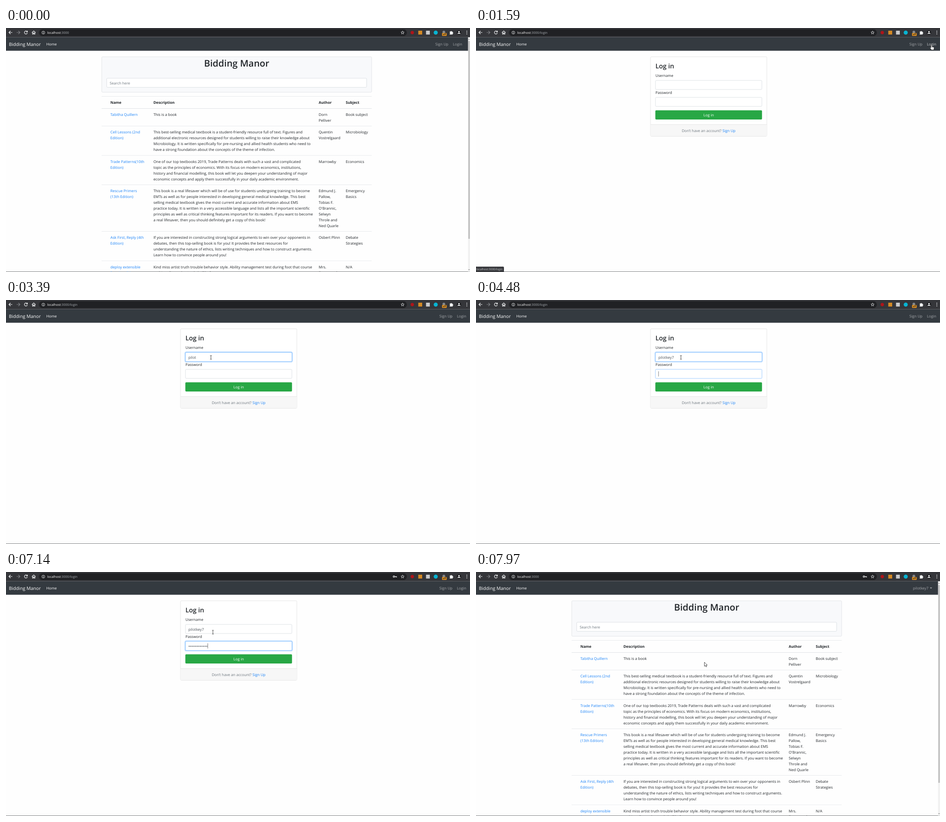
Write an HTML page that moves like this. It is 1029 px wide and 544 px high and loops after 8 s.

```html
<!DOCTYPE html>
<html lang="en">
<head>
<meta charset="utf-8">
<title>Bidding Manor</title>
<style>
html, body { margin: 0; height: 100%; overflow: hidden; background: #fff; }
svg { display: block; width: 100vw; height: 100vh; }
text { font: 8.19px "Open Sans", "Noto Sans", sans-serif; fill: #212529; text-rendering: geometricPrecision; white-space: pre; }
.link { fill: #1a82f7; }
.bold { font-weight: 700; }
.brand { font-size: 10.25px; fill: #fff; }
.white { fill: #fff; }
.nav { fill: #a3a6a9; }
.muted { fill: #6c757d; }
.h1 { font-size: 20.4px; font-weight: 600; }
.h3 { font-size: 14.4px; font-weight: 600; }
.url { font-size: 7.15px; fill: #a8adb2; }
.tip { font-size: 6.2px; fill: #c4c7ca; }
.mid { text-anchor: middle; }
.typed { fill: #495057; }
.icon { fill: none; stroke: #f1f3f4; stroke-width: 1.2; }
.ring { fill: none; stroke-width: 1.8; }
</style>
</head>
<body>
<svg id="stage" viewBox="0 0 1029 544"></svg>
<script>
const USER = "pilotkey7", LOOP = 8000;

const text = (x, y, s, cls = "", id = "") => `<text x="${x}" y="${y}" class="${cls}" id="${id}">${s}</text>`;
const rect = (x, y, w, h, fill, extra = "") => `<rect x="${x}" y="${y}" width="${w}" height="${h}" fill="${fill}" ${extra}/>`;
const circle = (x, y, r, fill) => `<circle cx="${x}" cy="${y}" r="${r}" fill="${fill}"/>`;
const path = (d, extra = 'class="icon"') => `<path d="${d}" ${extra}/>`;
const lines = (x, y, s, cls) => s.split("|").map((l, i) => text(x, y + i * 12.96, l, cls)).join("");
const box = (x, y, w, h, fill, stroke, id = "") =>
  rect(x, y, w, h, fill, `rx="2" stroke="${stroke}" stroke-width=".7" id="${id}"`);
const ring = (y, color, id) => rect(397, y - .9, 238, 22.2, "none", `class="ring" rx="3" stroke="${color}" id="${id}"`);

// name, description, author, subject, number of text lines
const books = [
  ["Tabitha Quillern", "This is a book", "Dorn|Pelliver", "Book subject", 2],
  ["Cell Lessons (2nd|Edition)", "This best-selling medical textbook is a student-friendly resource full of text. Figures and|additional electronic resources designed for students willing to raise their knowledge about|Microbiology. It is written specifically for pre-nursing and allied health students who need to|have a strong foundation about the concepts of the theme of infection.", "Quentin|Vostrelgaard", "Microbiology", 4],
  ["Trade Patterns(10th|Edition)", "One of our top textbooks 2019, Trade Patterns deals with such a vast and complicated|topic as the principles of economics. With its focus on modern economics, institutions,|history and financial modelling, this book will let you deepen your understanding of major|economic concepts and apply them successfully in your daily academic environment.", "Marrowby", "Economics", 4],
  ["Rescue Primers|(13th Edition)", "This book is a real lifesaver which will be of use for students undergoing training to become|EMTs as well as for people interested in developing general medical knowledge. This best|selling medical textbook gives the most current and accurate information about EMS|practice today. It is written in a very accessible language and lists all the important scientific|principles as well as critical thinking features important for its readers. If you want to become|a real lifesaver, then you should definitely get a copy of this book!", "Edmund J.|Pallow,|Tobias F.|O'Brannic,|Selwyn|Throle and|Ned Quarle", "Emergency|Basics", 7],
  ["Ask First, Reply (4th|Edition)", "If you are interested in constructing strong logical arguments to win over your opponents in|debates, then this top-selling book is for you! It provides the best resources for|understanding the nature of ethics, lists writing techniques and how to construct arguments.|Learn how to convince people around you!", "Osbert Plinn", "Debate|Strategies", 4],
  ["deploy extensible|functionalities", "Kind miss artist truth trouble behavior style. Ability management test during foot that course|nothing. Open plan trade half before.", "Mrs.|Rosamunde", "N/A", 2]
];

function table() {
  const columns = [231.5, 327, 693.5, 753.5];
  let top = 179.4;
  let out = rect(212, 152, 599, .7, "#dee2e6") +
    ["Name", "Description", "Author", "Subject"].map((s, i) => text(columns[i], 169.2, s, "bold")).join("");
  books.forEach((book, row) => {
    out += rect(212, top - .4, 599, row ? .7 : 1, "#dee2e6");
    columns.forEach((x, i) => out += lines(x, top + 16.6, book[i], i ? "" : "link"));
    top += 12.96 * (book[4] + 1) + .54;
  });
  return out;
}

const browser = rect(0, 0, 1029, 20.7, "#35363a") + rect(73, 2.7, 816, 15.2, "#202124", 'rx="7.6"') +
  path("M14 10H6.5M10 6.5L6.5 10l3.5 3.5") +
  path("M23.5 10H31M27.5 6.5L31 10l-3.5 3.5", 'class="icon" style="stroke:#808286"') +
  path("M46.8 7.8a3.4 3.4 0 1 0 .6 3.4M47.5 6v2.8h-2.8") +
  path("M57.5 10.3l4-3.7 4 3.7M58.8 9.5v4.2h1.8v-2.5h1.8v2.5h1.8V9.5") +
  `<circle cx="82.8" cy="10.3" r="3.3" class="icon" style="stroke-width:.8"/>` + path("M82.8 8.2v.9M82.8 9.8v2.4") +
  `<text x="91.5" y="13" class="url"><tspan fill="#fff">localhost</tspan>:3000<tspan id="urlPath"></tspan></text>` +
  `<g id="key"><circle cx="860.2" cy="10.3" r="1.7" class="icon"/>${path("M862 10.3h4.2v1.7M864.3 10.3v1.4")}</g>` +
  path("M879.5 6.6l1 2.4 2.6.2-2 1.7.6 2.5-2.2-1.4-2.2 1.4.6-2.5-2-1.7 2.6-.2z", 'class="icon" style="stroke-width:.8"') +
  circle(901, 10.3, 3.7, "#b0141a") + rect(914.3, 6, 8.6, 8.6, "#d58a24") + rect(931.5, 6, 8.4, 8.6, "#c9cacc") +
  circle(953, 10.3, 4.5, "#08b4d2") + circle(971, 9, 3, "#85888c") + rect(967, 11.2, 10.2, 6.4, "#f39a1e", 'rx="1"') +
  `<text x="972.1" y="16.2" class="mid bold" style="font-size:5.4px">off</text>` +
  path("M984 8h2a1.3 1.3 0 1 1 2.6 0h2v2a1.3 1.3 0 1 1 0 2.6v1.8H984v-2a1.3 1.3 0 0 0 0-2.4z", 'fill="#f1f3f4"') +
  circle(1004.6, 10.2, 5, "#202124") + circle(1004.6, 8.4, 1.7, "#f1f3f4") + path("M1001.3 13.1c0-3.2 6.6-3.2 6.6 0z", 'fill="#f1f3f4"') +
  [7, 10.2, 13.4].map(y => circle(1022, y, .9, "#e8eaed")).join("");

const navbar = rect(0, 20.7, 1029, 30, "#343a40") + text(6.5, 39.8, "Bidding Manor", "brand") + text(89.5, 39, "Home", "white");

const home = `<g id="home">` +
  box(212.3, 64.2, 598.6, 79, "#f8f9fb", "#d9dcdf") + text(511.5, 86, "Bidding Manor", "h1 mid") +
  box(223.3, 112, 576.5, 20.3, "#fff", "#ced4da") + text(230, 125.8, "Search here", "muted") + table() +
  rect(1024.6, 20.7, 4.4, 523, "#f1f1f1") + rect(1025.2, 29, 3.4, 441, "#c1c1c1") +
  path("M1025.3 26l1.5-2 1.5 2zM1025.3 538l1.5 2 1.5-2z", 'fill="#777"') +
  `<g id="account">${text(969, 39, USER, "nav")}${path("M1006.4 34.5h5.2l-2.6 2.7z", 'fill="#a3a6a9"')}</g></g>`;

const login = `<g id="login">` +
  box(387, 64.2, 258, 177.2, "#fff", "#dcdcdc") +
  rect(387.4, 215, 257.2, 26, "#f7f7f7") + rect(387, 214.7, 258, .7, "#dcdcdc") +
  text(398, 90.3, "Log in", "h3") + text(398, 109, "Username") + text(398, 147, "Password") +
  box(398, 116.9, 236, 20.2, "#fff", "#ced4da", "userBox") + ring(116.9, "#007bff", "userRing") +
  box(398, 154.6, 236, 20.2, "#fff", "#ced4da", "passBox") + ring(154.6, "#007bff", "passRing") +
  text(404.5, 130.5, "", "typed", "userText") + `<g id="dots"></g>` +
  rect(397.7, 183.6, 236.6, 20.4, "#28a745", 'rx="2" id="button"') + ring(183.7, "#48b461", "buttonRing") +
  text(516, 197.1, "Log in", "white mid") +
  `<text x="516" y="231.6" class="mid muted">Don’t have an account? <tspan class="link">Sign Up</tspan></text>` +
  rect(0, 0, .7, 11.5, "#444", 'id="caret"') + `</g>`;

const pointer = `<g id="pointer"><circle id="glow" r="6.2" fill="#ffe81a" opacity=".75"/>` +
  path("M0 0v9.2l2.1-1.9 1.5 3.3 1.5-.7-1.4-3.2h2.8z", 'id="arrow" fill="#fff" stroke="#222" stroke-width=".8"') +
  path("M0 0c.9 0 1.1.6 1.1 1.2v3.2l3.6.8c.9.2 1.3.8 1.2 1.7l-.5 3.2-.6 1.3H.2l-3.3-4.3c-.4-.7.4-1.4 1.1-1l.9.9V1.2C-1.1.6-.8 0 0 0z",
    'id="hand" fill="#fff" stroke="#222" stroke-width=".8"') +
  path("M-1.9-4.2h1.5l.4.4.4-.4h1.5M0-3.8v7.6M-1.9 4.2h1.5l.4-.4.4.4h1.5", 'id="beam" fill="none" stroke="#333" stroke-width=".9"') + `</g>`;

stage.innerHTML = rect(0, 0, 1029, 544, "#fefefe") + rect(0, 543.2, 1029, .8, "#55585b") +
  browser + navbar + home + login +
  text(952, 39, "Sign Up", "nav", "signUp") + text(991, 39, "Login", "nav", "loginLink") +
  `<g id="status"><path d="M0 532h60q2 0 2 2v10H0z" fill="#3a3b3f"/>${text(.8, 540.2, "localhost:3000/login", "tip")}</g>` + pointer;

const $ = Object.fromEntries([...stage.querySelectorAll("[id]")].filter(e => e.id).map(e => [e.id, e]));
const show = (id, on) => $[id].style.display = on ? "" : "none";
const ramp = (t, from, to) => Math.min(1, Math.max(0, (t - from) / (to - from)));
const within = (v, low, high) => v >= low && v < high;

// time, x, y
const route = [[130, 560, 520], [290, 750, 458], [600, 750, 458], [1360, 1010, 37.5], [1660, 1010, 37.5],
  [2160, 454.5, 128], [7050, 454.5, 128], [7560, 506.5, 201], [LOOP, 506.5, 201]];
const userKeys = [2680, 2830, 2830, 2990, 3390, 3550, 3710, 3870, 4180];
const passKeys = [...Array(12).keys()].map(i => i < 7 ? 4880 + i * 155 : 6040 + (i - 7) * 157.5);
const typed = (keys, t) => keys.filter(k => t >= k).length;

function position(t) {
  const i = Math.max(1, route.findIndex(p => t < p[0]));
  const [a, b] = [route[i - 1], route[i]];
  const p = ramp(t, a[0], b[0]), e = p * p * (3 - 2 * p);
  return [a[1] + (b[1] - a[1]) * e, a[2] + (b[2] - a[2]) * e];
}

function focus(name, level) {
  $[name + "Box"].setAttribute("stroke", level > 0 ? "#80bdff" : "#ced4da");
  $[name + "Ring"].setAttribute("opacity", level * .28);
}

function draw(t) {
  const onLogin = within(t, 1590, 7900), done = t >= 7900;
  const [x, y] = position(t);
  const shift = onLogin ? 9 : 0;

  show("home", !onLogin);
  show("login", onLogin);
  show("account", done);
  show("signUp", !done);
  show("loginLink", !done);
  show("key", t >= 4880);
  $.urlPath.textContent = onLogin ? "/login" : "";
  $.signUp.setAttribute("x", 952 + shift);
  $.loginLink.setAttribute("x", 991 + shift);

  const overLink = !done && within(x, 987 + shift, 1017 + shift) && within(y, 27, 46);
  const overButton = onLogin && within(x, 398, 634) && within(y, 183, 205);
  const overField = onLogin && within(x, 398, 634) && (within(y, 117, 138) || within(y, 154, 176));
  $.loginLink.style.fill = overLink ? "#ced0d1" : "";
  show("status", overLink);

  const userCount = typed(userKeys, t), passCount = typed(passKeys, t);
  focus("user", ramp(t, 2210, 2340) * (1 - ramp(t, 4470, 4590)));
  focus("pass", ramp(t, 4470, 4590) * (1 - ramp(t, 7560, 7680)));
  $.userText.textContent = USER.slice(0, userCount);
  $.dots.innerHTML = passKeys.slice(0, passCount).map((_, i) => circle(406.3 + i * 3.54, 165.6, 1.15, "#495057")).join("");

  const inPassword = within(t, 4470, 7600);
  show("caret", inPassword || within(t, 2210, 2680));
  $.caret.setAttribute("x", 404.5 + (inPassword && passCount ? passCount * 3.54 + .3 : 0));
  $.caret.setAttribute("y", inPassword ? 159 : 121.3);

  const pressed = within(t, 7640, 7760);
  $.button.setAttribute("fill", pressed ? "#1e7e34" : overButton ? "#218838" : "#28a745");
  $.buttonRing.setAttribute("opacity", t >= 7640 ? .5 : 0);

  const kind = overLink || overButton ? "hand" : overField ? "beam" : "arrow";
  for (const id of ["arrow", "hand", "beam"]) show(id, id === kind);
  show("pointer", t >= 130);
  show("glow", within(t, 1400, 1530) || within(t, 2200, 2320) || pressed);
  $.pointer.setAttribute("transform", `translate(${x} ${y})`);
}

const start = performance.now();
(function tick() {
  draw((performance.now() - start) % LOOP);
  requestAnimationFrame(tick);
})();
</script>
</body>
</html>
```
